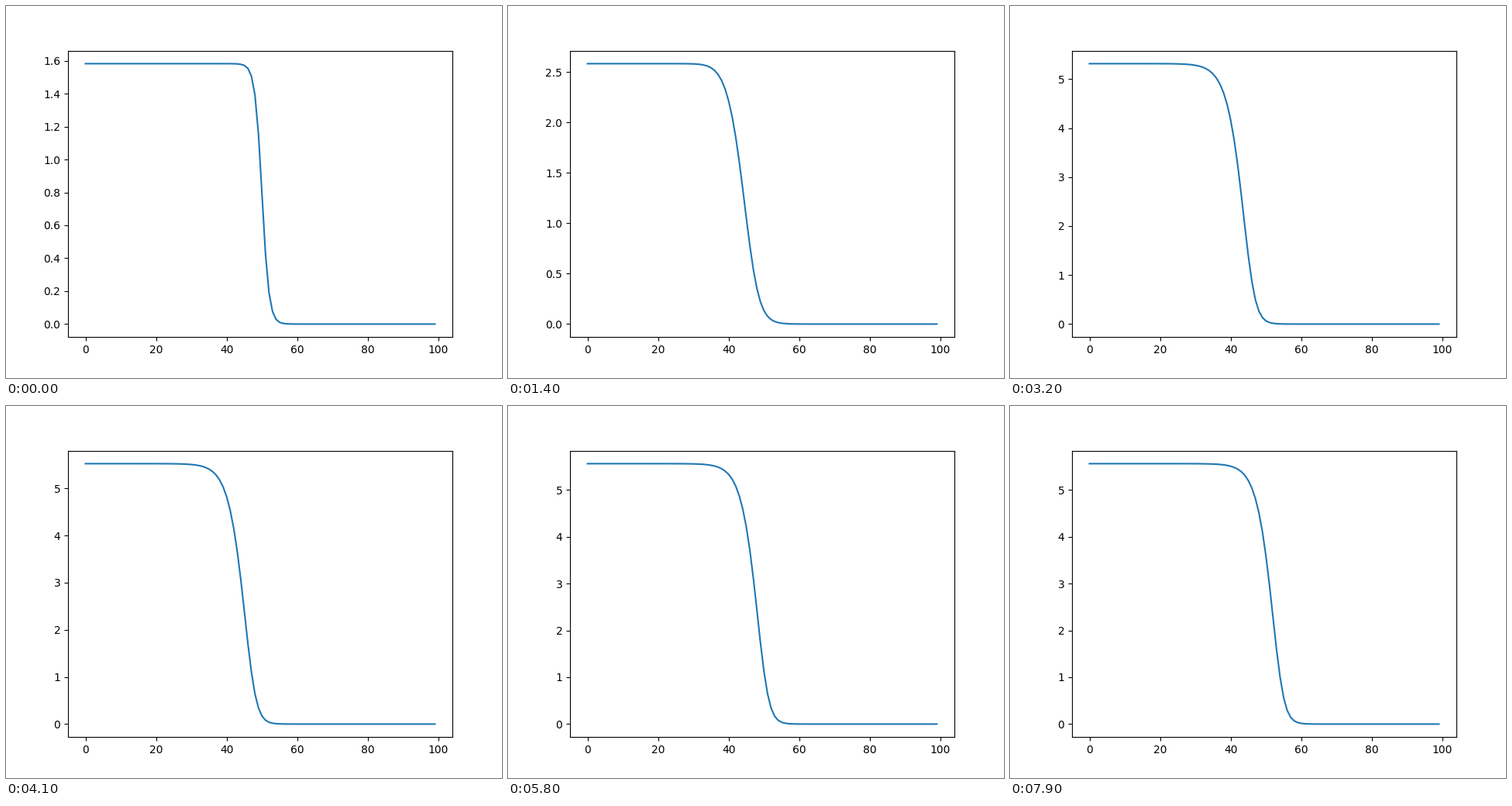
Recreate the animation shown at these times as a matplotlib script. Size 640x480 px, loop 8 s.

```python
import numpy as np
import matplotlib.pyplot as plt
from matplotlib.animation import FuncAnimation

FRAMES = 80
SUBSTEPS = 20
R, K, PREDATION, DIFFUSION = 0.5, 8.0, 1.0, 1.0

# Unstable equilibrium of the growth law; the left side starts 10% above it.
THRESHOLD = (7 - np.sqrt(17)) / 2
x = np.arange(100)


def rate(u):
    """Diffusion with closed ends, logistic growth and saturating predation."""
    p = np.pad(u, 1, mode="edge")
    spread = DIFFUSION * (p[2:] - 2 * u + p[:-2])
    return spread + R * u * (1 - u / K) - PREDATION * u / (1 + u)


def rk4(u, h):
    a = rate(u)
    b = rate(u + h / 2 * a)
    c = rate(u + h / 2 * b)
    d = rate(u + h * c)
    return u + h / 6 * (a + 2 * b + 2 * c + d)


def solve():
    u = 1.1 * THRESHOLD / (1 + np.exp(x - 50.0))
    states = [u]
    for _ in range(FRAMES - 1):
        for _ in range(SUBSTEPS):
            u = rk4(u, 1 / SUBSTEPS)
        states.append(u)
    return states


states = solve()

fig, ax = plt.subplots(figsize=(6.4, 4.8), dpi=100)
line, = ax.plot(x, states[0])


def update(i):
    line.set_ydata(states[i])
    ax.relim()
    ax.autoscale_view()
    return line,


anim = FuncAnimation(fig, update, frames=FRAMES, interval=100,
                     repeat=True, repeat_delay=0, blit=False)
plt.show()
```
